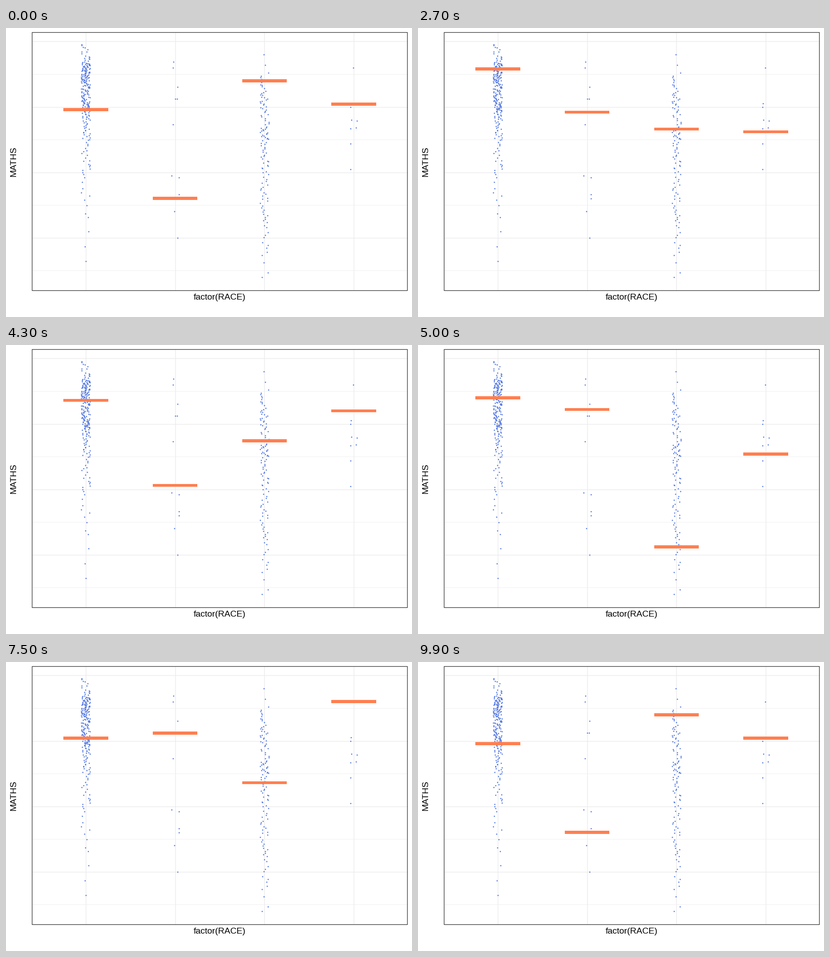
A matplotlib script that plays this animation: 885x632 px, repeating every 10 s.

```python
import matplotlib.pyplot as plt
import numpy as np
from matplotlib.animation import FuncAnimation
from matplotlib.patches import Rectangle

W, H, DPI = 885, 632, 100
PX = 72 / DPI
LEFT, TOP, RIGHT, BOTTOM = 57, 9.7, 875, 574.3
CENTRES = 173.8 + 194.75 * np.arange(4)
BAR_W, BAR_H = 97.4, 6.7
GRID, BLUE, CORAL = "#EBEBEB", "#4169E1", "#FF7F50"

plt.rcParams["font.family"] = "Liberation Sans"

# Points below full marks for each group, one row per draw
DRAWS = np.array([
    (26, 60, 15, 24), (20, 60, 56, 30), (13, 75, 37, 30), (20, 8, 26, 33),
    (10, 10, 37, 33), (22, 52, 32, 30), (18, 32, 37, 39), (3, 22, 30, 30),
    (20, 58, 79, 24), (19, 8, 57, 30), (14, 65, 30, 10), (18, 32, 33, 30),
    (11, 22, 81, 24), (19, 17, 63, 49), (22, 32, 78, 30), (15, 10, 20, 33),
    (20, 51, 36, 10), (9, 52, 32, 10), (9, 51, 34, 30), (24, 22, 41, 10),
    (18, 32, 48, 30), (22, 8, 36, 30), (17, 22, 30, 24), (17, 8, 68, 33),
    (14, 22, 36, 25),
])


def score_y(lost):
    return 29.45 + 5.722 * lost


def crowd(rng, heights, ranks):
    """Spread points down a column so that they follow a cumulative count."""
    n = ranks[-1] + 1
    order = np.arange(n) + rng.uniform(-0.4, 0.4, n)
    return rng.uniform(-9.7, 9.7, n), np.interp(order, ranks, heights)


def scatter_points():
    rng = np.random.default_rng(11)
    groups = [
        crowd(rng, [35, 62, 76, 100, 118, 160, 182, 200, 245, 288, 319, 395, 509],
              [0, 9, 18, 60, 92, 140, 172, 186, 208, 218, 226, 234, 238]),
        ([-4, -5, 5, 0, 4, -5, -8, 8, 8, 8, -2, 5],
         [73, 86, 128, 154, 154, 210, 322, 326, 363, 372, 400, 458]),
        crowd(rng, [57, 85, 101, 140, 180, 215, 245, 308, 350, 430, 498, 549],
              [0, 1, 2, 13, 30, 40, 58, 78, 88, 107, 116, 119]),
        ([-1, -6, -7, -5, 7, -7, 5, -7, -7],
         [86, 164, 172, 200, 202, 219, 217, 252, 308]),
    ]
    xs = [x + np.array(dx) for x, (dx, _) in zip(CENTRES, groups)]
    ys = [np.array(y) + 0.5 for _, y in groups]
    return np.concatenate(xs), np.concatenate(ys)


fig = plt.figure(figsize=(W / DPI, H / DPI), dpi=DPI, facecolor="white")
ax = fig.add_axes([0, 0, 1, 1])
ax.set(xlim=(0, W), ylim=(H, 0))
ax.axis("off")

for i in range(4):
    ax.hlines(score_y(25 * i + 12.5), LEFT, RIGHT, color=GRID, lw=0.7 * PX)
    ax.hlines(score_y(25 * i), LEFT, RIGHT, color=GRID, lw=1.4 * PX)
ax.vlines(CENTRES, TOP, BOTTOM, color=GRID, lw=1.4 * PX)

ax.plot(*scatter_points(), "o", color=BLUE, ms=2.7 * PX, mew=0, alpha=0.9, zorder=3)

bars = [ax.add_patch(Rectangle((x - BAR_W / 2, 0), BAR_W, BAR_H, fc=CORAL,
                               lw=0, zorder=4)) for x in CENTRES]

ax.add_patch(Rectangle((LEFT, TOP), RIGHT - LEFT, BOTTOM - TOP, fill=False,
                       ec="#333333", lw=1.3 * PX, snap=False, zorder=5))
label = dict(fontsize=19.2 * PX, color="black")
ax.text(465.5, 594.5, "factor(RACE)", ha="center", va="baseline", **label)
ax.text(25, 292.5, "MATHS", rotation=90, ha="right", va="center", **label)


def update(frame):
    # Three frames of rest, one halfway; the middle rest is a frame shorter
    draw, step = divmod(frame + (frame >= 50), 4)
    now, after = (DRAWS[k % len(DRAWS)] for k in (draw, draw + 1))
    lost = (now + after) / 2 if step == 3 else now
    for bar, y in zip(bars, score_y(lost)):
        bar.set_y(y - BAR_H / 2)
    return bars


anim = FuncAnimation(fig, update, frames=100, interval=100, repeat=True,
                     repeat_delay=0)
plt.show()
```
